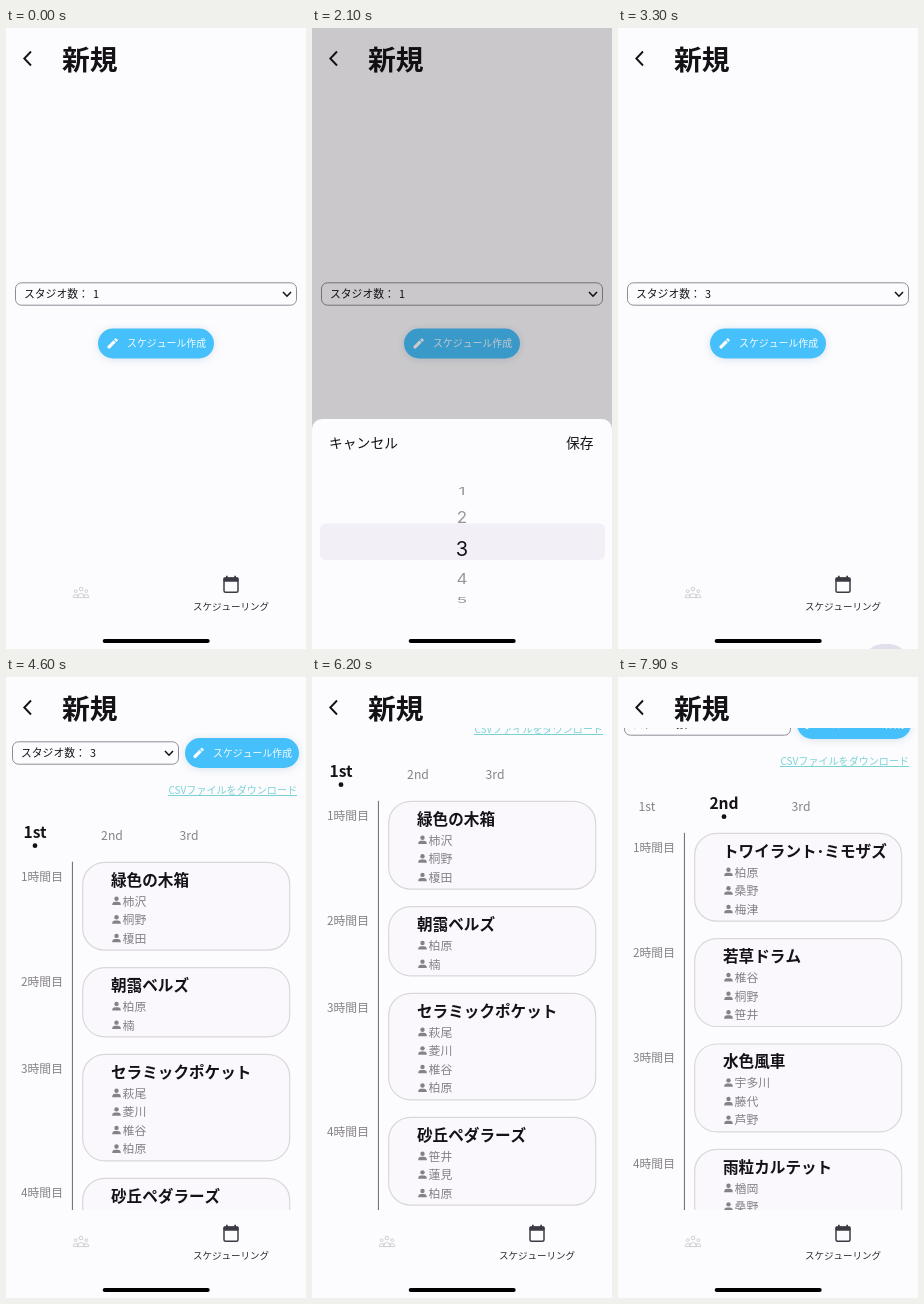
Recreate the animation shown at these times as an HTML page with a canvas. Size 300 by 621 pixels, loop 8 s.

```html
<!DOCTYPE html>
<html lang="ja">
<head>
<meta charset="utf-8">
<style>
html, body { margin: 0; width: 100%; height: 100%; overflow: hidden; background: #fcfcfe; }
canvas { display: block; width: 300px; height: 621px; }
</style>
</head>
<body>
<canvas id="stage"></canvas>
<script>
const W = 300, H = 621, LOOP = 8000;
const canvas = document.getElementById('stage');
const ctx = canvas.getContext('2d');
const ratio = window.devicePixelRatio || 1;
canvas.width = W * ratio;
canvas.height = H * ratio;

const JP = '"Noto Sans CJK JP", "Noto Sans CJK", "Noto Sans", sans-serif';
const DIGIT = 'Inter, Roboto, sans-serif';
const PAPER = '#fcfcfe', INK = '#141216', SOFT = '#858188', LINK = '#7ad2d6';

const days = [
  [
    ['緑色の木箱', '柿沢', '桐野', '榎田'],
    ['朝靄ベルズ', '柏原', '楠'],
    ['セラミックポケット', '萩尾', '菱川', '椎谷', '柏原'],
    ['砂丘ペダラーズ', '笹井', '蓮見', '柏原']
  ],
  [
    ['トワイラント･ミモザズ', '柏原', '桑野', '梅津'],
    ['若草ドラム', '椎谷', '桐野', '笹井'],
    ['水色風車', '宇多川', '藤代', '芦野'],
    ['雨粒カルテット', '楢岡', '桑野', '梅津']
  ]
];

const clamp = v => Math.max(0, Math.min(1, v));
const span = (t, start, end) => clamp((t - start) / (end - start));
const lerp = (a, b, u) => a + (b - a) * u;
const easeOut = u => 1 - (1 - u) ** 3;
const easeInOut = u => u * u * (3 - 2 * u);
const mix = (a, b, u) => `rgb(${a.map((v, i) => Math.round(lerp(v, b[i], u)))})`;

// y is the optical middle of the line
function text(str, x, y, size, color = INK, weight = 400, align = 'left', family = JP) {
  ctx.font = `${weight} ${size}px ${family}`;
  ctx.textAlign = align;
  ctx.fillStyle = color;
  ctx.fillText(str, x, y + size * 0.375);
}

function box(x, y, w, h, r, fill, stroke, line = 1) {
  ctx.beginPath();
  ctx.roundRect(x, y, w, h, r);
  if (fill) { ctx.fillStyle = fill; ctx.fill(); }
  if (stroke) { ctx.strokeStyle = stroke; ctx.lineWidth = line; ctx.stroke(); }
}

function dot(x, y, r, color) {
  ctx.beginPath();
  ctx.arc(x, y, r, 0, Math.PI * 2);
  ctx.fillStyle = color;
  ctx.fill();
}

function polyline(points, color, width) {
  ctx.beginPath();
  points.forEach(([x, y]) => ctx.lineTo(x, y));
  ctx.strokeStyle = color;
  ctx.lineWidth = width;
  ctx.stroke();
}

function clipped(x, y, w, h, draw) {
  ctx.save();
  ctx.beginPath();
  ctx.rect(x, y, w, h);
  ctx.clip();
  draw();
  ctx.restore();
}

function person(x, y) {
  dot(x, y - 2.4, 2.2, SOFT);
  box(x - 4.3, y + 0.7, 8.6, 3.3, [3, 3, 0, 0], SOFT);
}

function pencil(x, y) {
  ctx.save();
  ctx.translate(x, y);
  ctx.rotate(-Math.PI / 4);
  ctx.fillStyle = '#fff';
  ctx.beginPath();
  [[-6.6, 0], [-5.8, -1.6], [3, -1.6], [3, 1.6], [-5.8, 1.6]].forEach(([a, b]) => ctx.lineTo(a, b));
  ctx.fill();
  box(3.8, -1.6, 2.4, 3.2, 0.6, '#fff');
  ctx.restore();
}

function field(x, y, w, value) {
  box(x + 0.5, y - 11.2, w - 1, 22.4, 6, PAPER, '#8f8b96');
  text('スタジオ数：', x + 9, y, 10.8);
  text(value, x + 78, y, 10.8);
  const c = x + w - 10;
  polyline([[c - 4, y - 2], [c, y + 2.2], [c + 4, y - 2]], INK, 1.6);
}

function createButton(x, y, w, press) {
  ctx.save();
  ctx.shadowColor = 'rgba(70,120,160,.2)';
  ctx.shadowBlur = 8 * ratio;
  ctx.shadowOffsetY = ratio;
  box(x, y - 15, w, 30, 15, mix([70, 192, 251], [108, 204, 251], press));
  ctx.restore();
  const c = x + w / 2;
  pencil(c - 43.5, y);
  text('スケジュール作成', c - 29, y, 9.9, '#f4fbff');
}

function header() {
  polyline([[25, 23.5], [18.3, 30.5], [25, 37.5]], INK, 1.9);
  text('新規', 56, 32, 27.8, INK, 700);
}

function groupIcon() {
  const color = '#cfced2';
  [[75, 561, 1.8], [69.7, 563.2, 1.4], [80.3, 563.2, 1.4]].forEach(([x, y, r]) => {
    ctx.beginPath();
    ctx.arc(x, y, r, 0, Math.PI * 2);
    ctx.strokeStyle = color;
    ctx.lineWidth = 1;
    ctx.stroke();
  });
  box(71.8, 565.6, 6.4, 4, [3, 3, 0, 0], null, color);
  box(67.3, 566.8, 4.5, 2.8, [2, 0, 0, 0], null, color);
  box(78.2, 566.8, 4.5, 2.8, [0, 2, 0, 0], null, color);
}

function bottomNav() {
  groupIcon();
  const color = '#3d3a44';
  box(218, 550, 14, 14.2, 1.5, null, color, 1.5);
  box(217.5, 549.5, 15, 4.2, 1, color);
  box(220, 547.8, 1.7, 3, 0, color);
  box(228.3, 547.8, 1.7, 3, 0, color);
  text('スケジューリング', 225, 578, 9.5, '#2b2830', 400, 'center');
}

function formPage(value, press) {
  field(9, 266, 282, value);
  createButton(92, 315.5, 116, press);
}

function card(y, index, [title, ...names]) {
  const step = 49.4 + 18.65 * names.length;
  text(`${index + 1}時間目`, 15, y + 14.5, 11.8, SOFT);
  box(76.7, y + 0.5, 207, step - 17.5, 22, '#faf8fd', '#d9d8d9', 1.2);
  text(title, 105, y + 18, 15.6, INK, 700);
  names.forEach((name, i) => {
    const ny = y + 39.3 + i * 18.6;
    person(110.5, ny);
    text(name, 116.5, ny, 11.9, SOFT);
  });
  return step;
}

function schedulePage(day, scroll, press) {
  clipped(0, 51, W, 482, () => {
    const top = 76 - scroll;
    field(6, top, 167, '3');
    createButton(179, top, 114, press);
    text('CSVファイルをダウンロード', 291, top + 36.8, 10.07, LINK, 400, 'right');
    box(162, top + 42, 129, 0.9, 0, LINK);
    ['1st', '2nd', '3rd'].forEach((label, i) => {
      const x = 29 + i * 77, on = i === day;
      text(label, x, top + (on ? 79.5 : 82.5), on ? 15.6 : 12.2, on ? INK : SOFT, on ? 700 : 400, 'center');
      if (on) dot(x, top + 92.7, 2.4, INK);
    });
    let y = top + 108.8;
    box(65.9, y, 1.1, 533 - y, 0, '#77747c');
    days[day].forEach((slot, i) => { y += card(y, i, slot); });
  });
}

function wheel(middle, position) {
  const radius = 66, pitch = 28 * Math.PI / 180;
  for (let n = 1; n <= 9; n++) {
    const angle = (n - 1 - position) * pitch;
    if (Math.abs(angle) > 1.57) continue;
    const near = Math.abs(angle) < pitch / 2;
    ctx.save();
    ctx.translate(150, middle + radius * Math.sin(angle));
    ctx.scale(1, Math.cos(angle));
    text(String(n), 0, 0, near ? 20 : 17, near ? INK : '#97959b', 400, 'center', DIGIT);
    ctx.restore();
  }
}

function sheet(top, position, pressed) {
  box(0, top, W, H - top + 20, [10, 10, 0, 0], PAPER);
  if (pressed) box(245, top + 4, 46, 40, 20, `rgba(224,220,232,${0.9 * pressed})`);
  text('キャンセル', 17, top + 23.5, 13.8);
  text('保存', 254, top + 23.5, 13.8);
  box(8, top + 104.5, 285, 36.5, 6, '#f2eff6');
  wheel(top + 122.8, position);
}

function frame(t) {
  ctx.setTransform(ratio, 0, 0, ratio, 0, 0);
  ctx.fillStyle = PAPER;
  ctx.fillRect(0, 0, W, H);

  const dim = easeInOut(span(t, 100, 500)) * (1 - easeInOut(span(t, 2800, 3250)));
  const lift = easeOut(span(t, 400, 1240)) - easeOut(span(t, 2800, 3560));
  const press = t < 4000 ? 0 : 1 - span(t, 4300, 4600);

  if (t < 4300) {
    formPage(t < 2800 ? '1' : '3', press);
  } else {
    const down = 61 * easeOut(span(t, 5400, 6010));
    const back = 32 * easeInOut(span(t, 7350, 7900));
    schedulePage(t < 7200 ? 0 : 1, down - back, press);
  }
  header();
  bottomNav();

  if (dim > 0) {
    ctx.globalCompositeOperation = 'multiply';
    ctx.fillStyle = mix([255, 255, 255], [205, 203, 204], dim);
    ctx.fillRect(0, 0, W, H);
    ctx.globalCompositeOperation = 'source-over';
  }
  if (lift > 0) {
    const position = 2 * easeOut(span(t, 1500, 2620));
    sheet(lerp(H, 391, lift), position, span(t, 2600, 2800));
  }
  box(96.7, 611, 107, 4, 2, '#000');
}

function tick() {
  frame(performance.now() % LOOP);
  requestAnimationFrame(tick);
}
tick();
</script>
</body>
</html>
```
